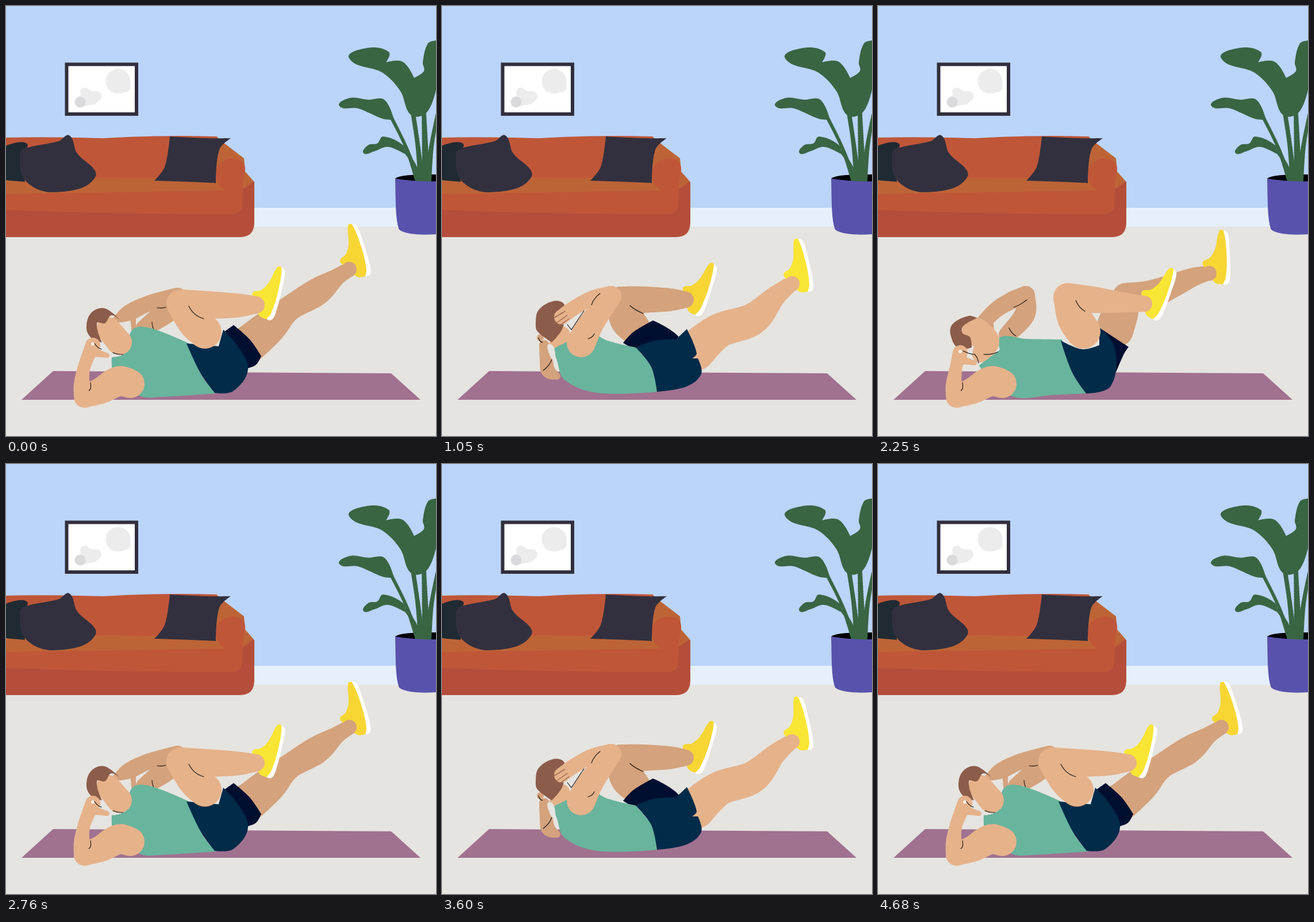
An HTML page that plays this animation: 748x748 px, repeating every 4.71 s.

```html
<!DOCTYPE html>
<html lang="en">
<head>
<meta charset="utf-8">
<title>Bicycle crunch</title>
<style>
html, body { margin: 0; width: 100%; height: 100%; overflow: hidden; background: #e5e4e0; }
svg { display: block; width: 100vw; height: 100vh; }
</style>
</head>
<body>
<svg id="stage" viewBox="0 0 748 748"></svg>
<script>
const FRONT = '#e6b28a', BACK = '#d4a27c', HAIR = '#8c5c4a', SHIRT = '#69b49d', FLOOR = '#e5e4e0';
const SHORTS = '#002b49', SHORTS2 = '#000f30', SHOE = '#f9e533', SHOE2 = '#f7d634';
const SOFA = '#c05638', SEAT = '#bd6437', PILLOW = '#32303f', GREEN = '#396543';

const shape = (color, d) => `<path fill="${color}" d="${d}"/>`;
const rect = (color, x, y, w, h) => `<rect fill="${color}" x="${x}" y="${y}" width="${w}" height="${h}"/>`;
const dot = (color, x, y, r) => `<circle fill="${color}" cx="${x}" cy="${y}" r="${r}"/>`;
const line = (d, w = 1.1, color = '#111') =>
  `<path d="${d}" fill="none" stroke="${color}" stroke-width="${w}" stroke-linecap="round"/>`;
const parse = text => text.split(' ').map(s => s.replace('*', '').split(',').map(Number));

// Closed smooth outline through a few points; "*" marks a sharp corner.
function blob(color, text) {
  const pts = parse(text), sharp = text.split(' ').map(s => s.endsWith('*')), n = pts.length;
  const dir = pts.map((p, i) => {
    const a = pts[(i + n - 1) % n], b = pts[(i + 1) % n];
    const dx = b[0] - a[0], dy = b[1] - a[1], len = Math.hypot(dx, dy);
    return sharp[i] ? [0, 0] : [dx / len, dy / len];
  });
  const curves = pts.map((p, i) => {
    const j = (i + 1) % n, q = pts[j], k = Math.hypot(q[0] - p[0], q[1] - p[1]) * 0.34;
    return `C${p[0] + dir[i][0] * k} ${p[1] + dir[i][1] * k} ${q[0] - dir[j][0] * k} ${q[1] - dir[j][1] * k} ${q}`;
  });
  return shape(color, `M${pts[0]}${curves.join('')}Z`);
}

// Round body part swept along a smooth line of "x,y,radius" joints.
function limb(color, text) {
  const pts = parse(text), at = i => pts[Math.max(0, Math.min(pts.length - 1, i))], STEPS = 30;
  let d = '';
  for (let s = 0; s <= (pts.length - 1) * STEPS; s++) {
    const i = Math.floor(s / STEPS), t = s / STEPS - i;
    const [x, y, r] = [0, 1, 2].map(k => {
      const [a, b, c, e] = [at(i - 1)[k], at(i)[k], at(i + 1)[k], at(i + 2)[k]];
      return b + t * ((c - a) + t * ((2 * a - 5 * b + 4 * c - e) + t * (3 * b - a - 3 * c + e))) / 2;
    });
    d += `M${x - r} ${y}a${r} ${r} 0 1 0 ${2 * r} 0a${r} ${r} 0 1 0 ${-2 * r} 0`;
  }
  return shape(color, d);
}

// Shoe around the ankle, toes up when the angle is 0.
function shoe(color, skin, x, y, angle) {
  return `<g transform="translate(${x} ${y}) rotate(${angle})">` +
    blob('#fff', '3,-79* 13,-76 25,-45 37,-3 36,9 28,11 14,-20') +
    blob(color, '-2,-76 5,-78 22,-36 30,0 28,12* 14,13 -15,-12 -15,-18 -6,-26 -1,-44') +
    '</g>' + dot(skin, x, y, 13);
}

// Near arm resting on the mat, hand placed behind the ear.
const nearArm = (x, y) =>
  limb(FRONT, `${x},${y},13 136,628,11 132,658,14 137,680,19`) +
  limb(FRONT, '139,678,20 165,669,23 195,653,26 216,657,25') +
  limb(FRONT, `${x},${y + 12},8 ${x + 25},${y + 18},4`) +
  dot('#f3efe9', x, y - 2, 3) + line('M147 655Q149 667 144 669');

const room = [
  rect('#bbd4fa', 0, 0, 748, 352),
  rect('#e6f0fd', 0, 351, 748, 33),
  rect(FLOOR, 0, 384, 748, 364),
  // picture
  rect('#312f3d', 102.5, 98.5, 127.5, 92.5),
  rect('#fff', 108.5, 104.5, 115.5, 80.5),
  dot('#ececec', 195, 131, 21.5) + dot('#ececec', 207, 140, 10),
  limb('#ececec', '137,150,8 146,160,12 157,157,9') + limb('#ececec', '140,162,11 129,167,9'),
  dot('#dadadc', 129, 167, 9.5),
  // sofa
  shape('#b44e3a', 'M0 340L412 300L432 306V376Q432 402 407 402H0Z'),
  shape(SEAT, 'M0 290L366 227L380 239L414 265L416 288L431 305L380 340H0Z'),
  shape(SOFA, 'M0 229Q60 227 170 230Q270 224 367 227L362 300L0 297Z'),
  shape(SOFA, 'M0 327L382 321Q365 312 365 292C366 260 417 256 416 284Q411 310 411 345Q411 362 390 362Q190 362 0 355Z'),
  blob('#1f2a33', '0,243* 36,239 28,262 33,306* 0,303*'),
  blob(PILLOW, '24,258 32,248 92,235 110,225 123,255 155,298 82,324 33,303'),
  blob(PILLOW, '285,227* 350,230 391,230* 371,250 365,308* 320,306 258,304* 276,280'),
  // plant
  shape('#000', 'M677 300C686 293 720 293 748 293V307H690Z'),
  ['670,193,3 696,246,3 717,305,5', '691,250,2 708,273,3 721,305,5', '708,186,4 716,240,4 723,305,6',
    '727,186,4 731,305,7', '750,190,3 740,245,4 734,305,6'].map(s => limb(GREEN, s)).join(''),
  shape('#5852ac', 'M677 300Q710 306 748 305V397C722 399 694 397 684 389C677 371 678 337 677 300Z'),
  blob(GREEN, '597,91 628,73 666,80 661,98* 690,97 710,125* 727,113 725,98 734,65 748,60* 748,146* 732,185 705,190 686,148 655,116'),
  blob(GREEN, '580,174 598,160 630,163 658,163 675,198* 655,196 612,178'),
  blob(GREEN, '622,256 630,242 646,239 656,227 692,243 693,257* 664,245 640,253'),
  shape('#a17190', 'M82 635L670 639L721 685H27Z')
].join('');

const crunchLeft = [
  limb(BACK, '420,590,33 456,560,30 492,527,22 540,498,24 575,472,15 597,458,13'),
  shoe(SHOE2, BACK, 597, 458, 0),
  blob(SHORTS2, '379,567* 396,555* 424,580 444,609* 435,624 421,630*'),
  limb(BACK, '192,545,6 215,533,14 250,517,14 298,507,17'),
  limb(BACK, '221,540,5 222,562,4'),
  limb(BACK, '300,518,20 265,543,18 240,560,14'),
  line('M263 525Q272 526 278 524M254 550Q254 558 258 564'),
  blob(SHIRT, '184,611* 207,604 220,563 250,560 320,588* 340,642 365,674* 270,680 235,679 190,650'),
  blob(SHORTS, '314,587* 370,592* 378,563* 402,590 421,632 395,670 363,673* 338,638'),
  shoe(SHOE, FRONT, 435, 520, 31),
  limb(FRONT, '304,518,25 350,520,24 400,521,21 435,520,15'),
  limb(FRONT, '304,518,25 327,549,29 346,567,29'),
  line('M318 522Q326 539 344 544'),
  limb(FRONT, '178,562,21 197,585,22'),
  blob(HAIR, '140,561 148,534 172,526 204,552* 184,538 172,552 158,552 167,585* 150,579'),
  nearArm(151, 590),
  line('M186 603Q195 607 204 606M154 587Q159 595 166 597')
].join('');

const open = [
  limb(BACK, '431,505,23 422,532,31 412,562,33'),
  limb(BACK, '431,505,23 470,503,25 510,488,21 550,471,16 577,465,12'),
  shoe(SHOE2, BACK, 576, 465, 15),
  blob(SHORTS2, '384,559* 436,593* 428,605 414,637*'),
  limb(BACK, '182,552,13 205,529,14 231,513,15 257,503,16'),
  limb(BACK, '257,503,16 255,537,18 225,572,15'),
  limb(BACK, '188,545,12 196,562,6'),
  line('M236 524Q248 520 259 511M228 560Q232 570 240 574'),
  blob(SHIRT, '176,625* 212,598* 213,576 258,579 320,580* 340,638 363,674* 300,677 240,681 195,655'),
  blob(SHORTS, '318,582* 355,597 385,590* 385,559* 412,595 405,661 362,674* 338,638'),
  shoe(SHOE, FRONT, 463, 518, 37),
  limb(FRONT, '330,507,25 375,511,23 430,516,17 463,518,14'),
  limb(FRONT, '330,507,25 342,543,30 357,566,30'),
  line('M344 512Q349 525 360 531'),
  limb(FRONT, '170,566,24 189,584,22 178,606,14'),
  blob(HAIR, '126,571 130,553 158,539 172,543* 148,557 147,569 160,576 163,594* 140,596'),
  nearArm(143, 603),
  line('M184 606Q198 607 208 602M148 600Q160 606 168 606Q174 612 175 621')
].join('');

const crunchRight = [
  limb(BACK, '178,590,9 181,615,11 185,635,12 200,644,6'),
  limb(BACK, '311,513,25 322,545,30 340,566,26'),
  shoe(SHOE2, BACK, 424, 511, 35),
  limb(BACK, '311,513,25 350,511,23 395,511,20 424,511,14'),
  line('M327 521Q334 528 350 535'),
  blob(SHORTS2, '315,586* 333,567 367,547* 412,576 400,590 335,595'),
  limb(FRONT, '440,600,35 482,565,30 540,545,28 580,505,18 609,482,13'),
  shoe(SHOE, FRONT, 609, 483, 4),
  blob(SHIRT, '192,600* 222,573 264,567* 285,581 337,594* 364,628 376,671* 270,673 213,650 199,614'),
  blob(SHORTS, '337,594* 370,582 407,580* 426,562* 443,604 435,613* 445,613* 451,640 425,662 374,671* 364,628'),
  dot(BACK, 171, 577, 6),
  limb(FRONT, '208,572,15 192,590,6'),
  blob(HAIR, '163,552 168,529 195,513 213,520 210,560 191,585* 166,566'),
  limb(FRONT, '242,586,25 260,552,22 294,505,18'),
  limb(FRONT, '294,505,18 262,508,13 230,525,13 208,541,13'),
  blob(FLOOR, '187,588 198,613 190,613'),
  line('M194 543L214 531M198 552L218 538M204 556L221 544', 1.5, '#9c6951'),
  line('M247 530Q235 548 225 563L218 554M260 520Q264 508 275 500M265 570Q262 577 254 579M176 634Q187 626 191 615M168 577Q170 585 175 585')
].join('');

const poses = [crunchLeft, open, crunchRight].map(p => `<g class="pose">${p}</g>`);
const stage = document.getElementById('stage');
stage.innerHTML = room + poses.join('');
const groups = stage.querySelectorAll('.pose');

// Two repetitions per loop: crunch, open, opposite crunch, open.
const LOOP = 4710, REP = LOOP / 2;
const steps = [[885, 0], [1020, 1], [2190, 2], [2310, 1], [REP, 0]];

function draw(ms) {
  const t = ms % REP;
  const pose = steps.find(([end]) => t < end)[1];
  groups.forEach((g, i) => g.setAttribute('visibility', i === pose ? 'visible' : 'hidden'));
}
const start = performance.now();
function tick() {
  draw(performance.now() - start);
  requestAnimationFrame(tick);
}
draw(0);
requestAnimationFrame(tick);
</script>
</body>
</html>
```
